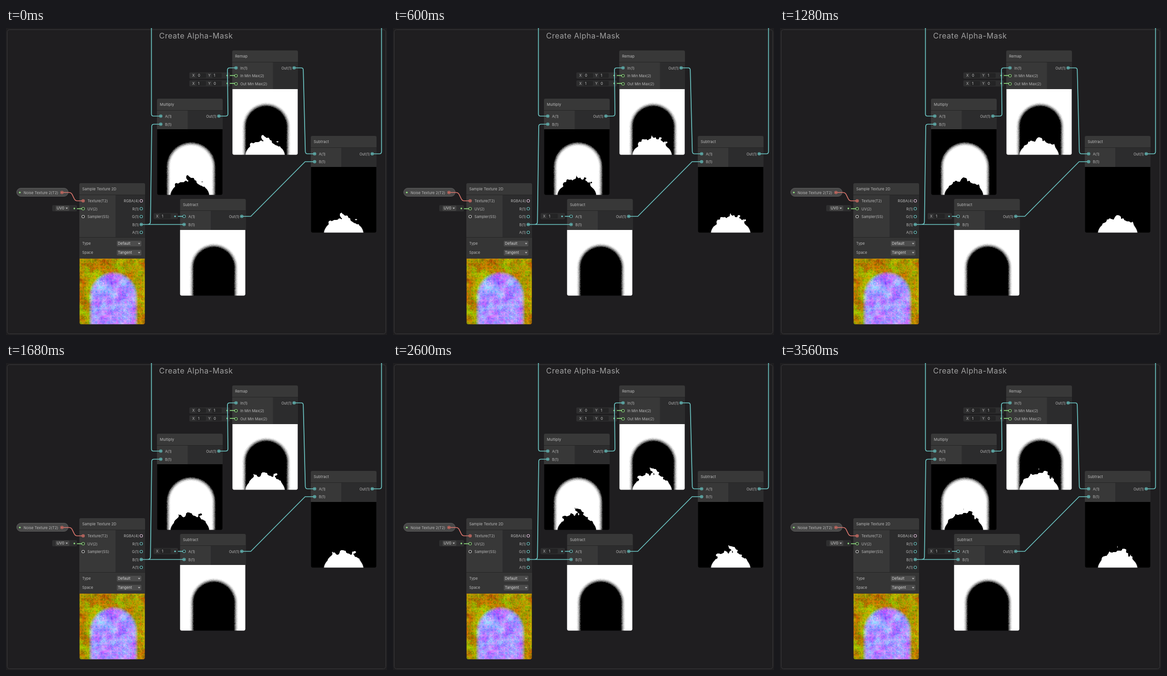
An HTML page with a canvas that plays this animation: 800x643 px, repeating every 3.6 s.

```html
<!DOCTYPE html>
<html>
<head>
<meta charset="utf-8">
<style>
  html, body { margin: 0; width: 100%; height: 100%; overflow: hidden; background: #1f1e20; }
  canvas { display: block; }
</style>
</head>
<body>
<canvas id="stage" width="800" height="643"></canvas>
<script>
const ctx = document.getElementById('stage').getContext('2d');
const SIZE = 138, LOOP = 3600, STEP = 40;
const TEAL = '#6cc6c4', GREEN = '#8fdc80', RED = '#dc766d', PINK = '#e6c3e0', GREY = '#c8c8c8';

// ---------- drawing helpers ----------
function box(x, y, w, h, fill, radius = 0, stroke) {
  ctx.beginPath();
  ctx.roundRect(x, y, w, h, radius);
  if (fill) { ctx.fillStyle = fill; ctx.fill(); }
  if (stroke) { ctx.strokeStyle = stroke; ctx.lineWidth = 1; ctx.stroke(); }
}

function text(str, x, y, size = 7.6, color = '#bababa', align = 'left') {
  ctx.font = size + 'px Inter, sans-serif';
  ctx.textAlign = align;
  ctx.textBaseline = 'alphabetic';
  ctx.fillStyle = color;
  ctx.fillText(str, x, y + size * 0.36);
}

function dot(x, y, r, color) {
  ctx.beginPath();
  ctx.arc(x, y, r, 0, 7);
  ctx.fillStyle = color;
  ctx.fill();
}

function port(x, y, color, linked) {
  dot(x, y, 3.3, color);
  dot(x, y, 2.2, '#202020');
  if (linked) dot(x, y, 1.7, color);
}

function wire(color, d) {
  ctx.strokeStyle = color;
  ctx.lineWidth = 1.7;
  ctx.stroke(new Path2D(d));
}

function caret(x, y) {
  ctx.fillStyle = '#b8b8b8';
  ctx.fill(new Path2D(`M${x - 2.5} ${y - 1.3}h5l-2.5 3z`));
}

function node(title, x, y, split, portsHeight) {
  box(x, y, SIZE, 25 + portsHeight, '#383838', [3, 3, 0, 0]);
  box(split, y + 25, x + SIZE - split, portsHeight, '#2c2c2d');
  box(x, y + 24, SIZE, 1, '#242424');
  text(title, x + 6, y + 12.5, 7.9);
}

function input(label, x, y, color, linked) {
  port(x, y, color, linked);
  text(label, x + 9, y + 0.5);
}

function output(label, x, y, color, linked) {
  port(x, y, color, linked);
  text(label, x - 5, y + 0.5, 7.6, '#bababa', 'right');
}

function vector(y, a, b) {
  box(385, y - 6.5, 85, 13, '#2e2e2f', 2);
  [['X', 391, a, 400], ['Y', 424.5, b, 433]].forEach(([name, nx, value, fx]) => {
    text(name, nx, y);
    box(fx, y - 5, 20, 10, '#242425', 2);
    text(value, fx + 3, y, 7.6, '#d0d0d0');
  });
  dot(464.5, y, 1.7, GREEN);
  wire(GREEN, `M470 ${y}H481`);
}

function dropdown(label, value, y) {
  text(label, 160, y);
  box(232, y - 6.5, 53, 13, '#4c4c4c', 2, '#303030');
  text(value, 235, y, 7.6, '#d8d8d8');
  caret(279.5, y);
}

// ---------- the graph ----------
function drawGraph() {
  box(2.5, 3.5, 795, 637, null, 5, '#3b3a3c');
  ctx.letterSpacing = '0.53px';
  text('Create Alpha-Mask', 321.5, 16, 16, '#a0a0a0');
  ctx.letterSpacing = '0.06px';

  node('Remap', 475, 47, 560.5, 56);
  node('Multiply', 317, 148, 381.5, 39);
  node('Subtract', 640, 226, 704, 40);
  node('Subtract', 365.5, 358, 430, 40);
  node('Sample Texture 2D', 154, 325, 230, 89);
  box(154, 439, SIZE, 44, '#353535');
  box(154, 438, SIZE, 1, '#242424');
  dropdown('Type', 'Default', 451.5);
  dropdown('Space', 'Tangent', 470.5);

  vector(99.5, '0', '1');
  vector(116, '1', '0');

  box(310, 387.5, 51, 13, '#2e2e2f', 2);
  text('X', 315, 394);
  box(324, 389, 22, 10, '#242425', 2);
  text('1', 327, 394, 7.6, '#d0d0d0');
  dot(355, 394.5, 1.7, TEAL);

  box(97, 371, 52, 13, '#2e2e2f', 2);
  box(104, 372, 29, 11, '#424242', 2);
  text('UV0', 106.5, 377.5, 7.6, '#d8d8d8');
  caret(127.5, 377.5);
  dot(143.5, 378, 1.7, GREEN);

  box(22.5, 335.5, 108, 17, '#484848', 8.5, '#5e5e5e');
  dot(29, 344.5, 1.8, GREEN);
  text('Noise Texture 2(T2)', 37, 345);

  wire(TEAL, 'M305.4 0V180Q305.4 184.5 309.5 184.5H325');
  wire(TEAL, 'M284 411.5H374M297 411.5Q303.2 411.5 303.3 406L306 206Q306 201.5 311 201.5H325');
  wire(TEAL, 'M447 184.5H461Q466 184.5 466 180L465 88Q465 83.5 470 83.5H483');
  wire(TEAL, 'M605 83.5H620Q624 83.5 624.2 88L628.5 259Q629 263.5 633 263.5H648');
  wire(TEAL, 'M495 394.5H514L628 280H648');
  wire(TEAL, 'M769 263.5H784Q788.5 263.5 788.5 259V0');
  wire(TEAL, 'M361 394.5H372');
  wire(GREEN, 'M149 378.5H160');
  wire(RED, 'M118 344.5H132Q137 344.5 139 349L143 357Q145 362 150 362H162');

  input('In(1)', 483, 83.5, TEAL, true);
  input('In Min Max(2)', 483, 100, GREEN);
  input('Out Min Max(2)', 483, 117, GREEN);
  output('Out(1)', 605, 83.5, TEAL, true);
  input('A(1)', 325, 184.5, TEAL, true);
  input('B(1)', 325, 201.5, TEAL, true);
  output('Out(1)', 447, 184.5, TEAL, true);
  input('A(1)', 648, 263.5, TEAL, true);
  input('B(1)', 648, 280, TEAL, true);
  output('Out(1)', 769, 263.5, TEAL, true);
  input('A(1)', 374, 394.5, TEAL);
  input('B(1)', 374, 411.5, TEAL, true);
  output('Out(1)', 495, 394.5, TEAL, true);
  input('Texture(T2)', 162, 362, RED, true);
  input('UV(2)', 162, 378.5, GREEN);
  input('Sampler(SS)', 162, 395, GREY);
  output('RGBA(4)', 284, 362, PINK);
  output('R(1)', 284, 378.5, TEAL);
  output('G(1)', 284, 395, TEAL);
  output('B(1)', 284, 411.5, TEAL, true);
  output('A(1)', 284, 428, TEAL);
  port(117.5, 344.5, RED, true);
}

// ---------- noise and masks ----------
const clamp = v => Math.min(1, Math.max(0, v));
const smooth = v => (v = clamp(v)) * v * (3 - 2 * v);
const display = v => 255 * Math.pow(clamp(v), 1 / 2.2);

function hash(x, y) {
  const v = Math.sin(x * 127.1 + y * 311.7) * 43758.5453;
  return v - Math.floor(v);
}

function noise(x, y) {
  const i = Math.floor(x), j = Math.floor(y), u = smooth(x - i), v = smooth(y - j);
  const top = hash(i, j) * (1 - u) + hash(i + 1, j) * u;
  const low = hash(i, j + 1) * (1 - u) + hash(i + 1, j + 1) * u;
  return top * (1 - v) + low * v;
}

// Soft round-topped door shape
function arch(x, y) {
  const edge = 47 - Math.hypot(x - 71, Math.min(0, y - 78)) + (hash(x, y) - 0.5) * 1.4;
  return smooth(edge / 9.5 + 0.5);
}

// Smooth dome whose crown is eaten by rising noise
function flame(x, y, seconds) {
  const h = SIZE - y, rise = seconds * 40;
  const dome = 1 - Math.pow(h / 39, 1.9) - Math.abs(x - 68.5) / 41;
  if (dome < -0.9) return 0;
  const n = noise(x / 8, (y + rise) / 9) * 1.2 + noise(x / 4 + 50, (y + rise * 1.2) / 5) * 0.8 - 1;
  return clamp(0.5 + 22 * (dome + 0.65 * smooth((h - 12) / 24) * n));
}

// Red and green of the noise texture: blotches, grain and small rings
function speckle(x, y) {
  const cx = Math.floor(x / 8), cy = Math.floor(y / 8), r = 1 + 2 * hash(cx + 9, cy);
  const d = Math.hypot(x - cx * 8 - 2 - 4 * hash(cx, cy + 5), y - cy * 8 - 2 - 4 * hash(cx + 3, cy + 7));
  const ring = Math.abs(d - r) < 0.8 ? 45 : 0;
  const a = x * 0.8 + y * 0.6, b = y * 0.8 - x * 0.6;
  const red = 186 + 50 * (noise(a / 12 + 30, b / 12) - 0.5) + 40 * (noise(x / 2.5, y / 2.5 + 70) - 0.5) - ring;
  const green = 148 + 80 * (noise(a / 17 + 8, b / 17 + 14) - 0.5) + 60 * (noise(b / 7, a / 7 + 40) - 0.5)
    + 45 * (noise(x / 2.5 + 90, y / 2.5) - 0.5);
  return [red, green];
}

// ---------- previews ----------
const mask = new Float32Array(SIZE * SIZE);
for (let i = 0; i < mask.length; i++) mask[i] = arch(i % SIZE, Math.floor(i / SIZE));

function preview(left, top, shade) {
  const image = ctx.createImageData(SIZE, SIZE);
  for (let i = 0; i < mask.length; i++) {
    const x = i % SIZE, y = Math.floor(i / SIZE);
    const corner = Math.hypot(Math.max(0, Math.abs(x - 68.5) - 65), Math.max(0, y - 133.5));
    const [r, g, b] = shade(i, x, y);
    image.data.set([r, g, b, 255 * clamp(4 - corner)], i * 4);
  }
  ctx.putImageData(image, left, top);
}

function grey(left, top, value) {
  preview(left, top, i => Array(3).fill(display(value(i))));
}

drawGraph();
grey(365, 423, i => 1 - mask[i]);
preview(154, 483, (i, x, y) => [...speckle(x, y), display(mask[i])]);

const fire = new Float32Array(SIZE * SIZE);
let shown = -1;

function render(now) {
  const t = Math.floor(now / STEP) * STEP % LOOP;
  if (t !== shown) {
    shown = t;
    for (let i = 75 * SIZE; i < fire.length; i++) {
      fire[i] = flame(i % SIZE, Math.floor(i / SIZE), t / 1000);
    }
    grey(317, 212, i => mask[i] * (1 - fire[i]));
    grey(475, 128, i => 1 - mask[i] * (1 - fire[i]));
    grey(640, 291, i => mask[i] * fire[i]);
  }
  requestAnimationFrame(render);
}
render(performance.now());
</script>
</body>
</html>
```
